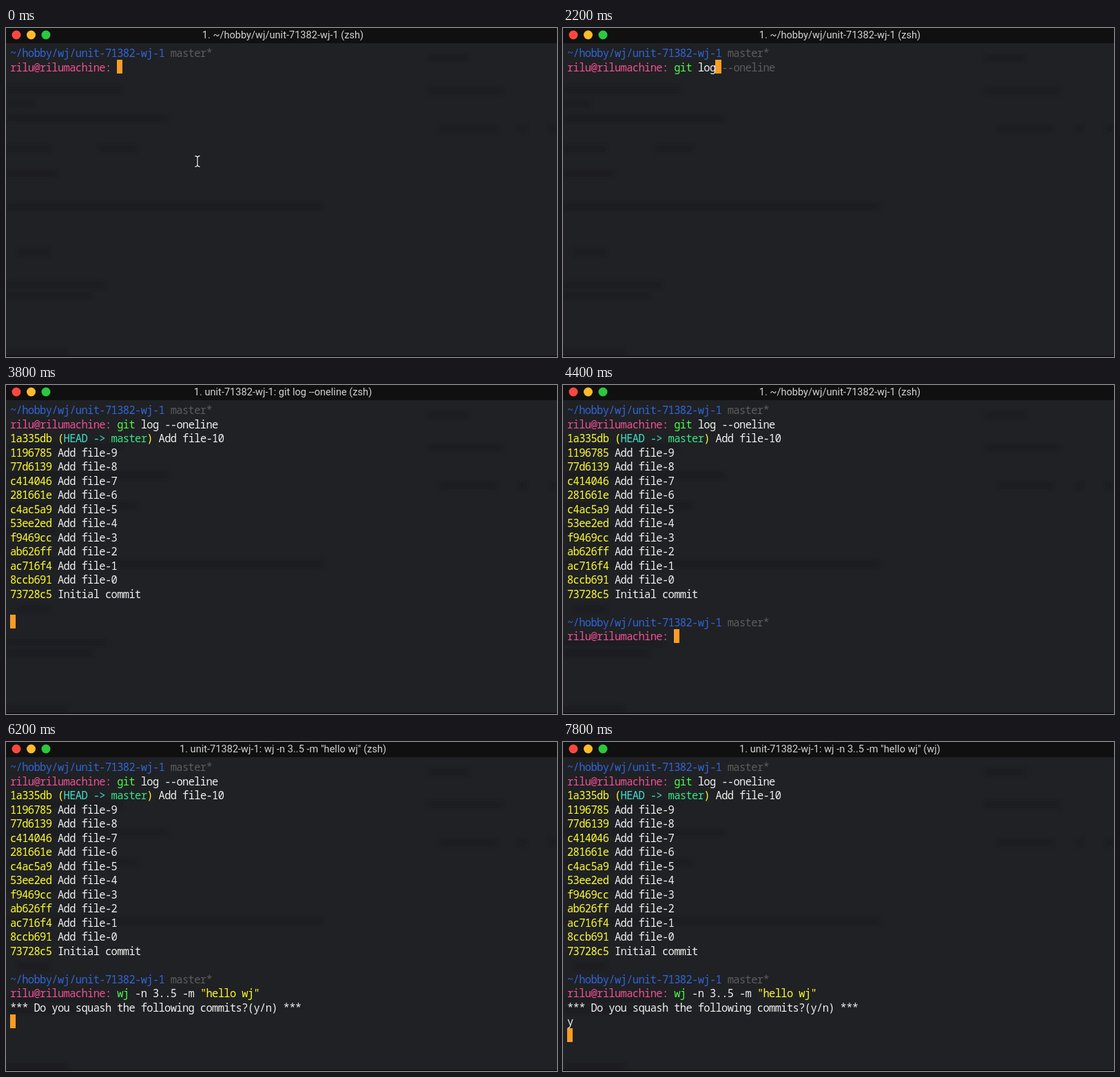
An HTML page that plays this animation: 800x477 px, repeating every 8000 ms.

```html
<!DOCTYPE html>
<html lang="en">
<head>
<meta charset="utf-8">
<title>Terminal</title>
<style>
html, body { margin: 0; width: 100%; height: 100%; overflow: hidden; background: #202124; }
#stage { position: relative; width: 800px; height: 477px; overflow: hidden; background: #202124; }
#stage > * { position: absolute; }
#bar { left: 0; top: 0; width: 800px; height: 22px; background: #101011; }
#title { left: 2px; top: 0; width: 800px; text-align: center; color: #d2d2d2;
  font: 14.6px/21px Roboto, sans-serif; white-space: pre; }
svg { left: 0; top: 0; }
#screen { left: 6px; top: 26.25px; margin: 0; color: #f0f0f0;
  font: 15.5px/20.5px "Noto Sans Mono", monospace; letter-spacing: calc(8.62px - .6em); }
#cursor { width: 8.7px; height: 20px; background: #f99d25; }
.path { color: #2f65d8; } .dim { color: #5c5c5d; } .user { color: #ee5096; }
.ok { color: #4dfa4b; } .bad { color: #f5483f; } .hash { color: #fdfd2c; }
.head { color: #3fe0c8; } .branch { color: #35e887; } .under { color: #4a3a1c; }
</style>
</head>
<body>
<div id="stage">
  <svg width="800" height="477">
    <defs><filter id="soft"><feGaussianBlur stdDeviation="2.5"/></filter></defs>
    <g id="ghosts" fill="#17181a" opacity=".35" filter="url(#soft)"></g>
    <rect y="475.5" width="800" height="1.5" fill="#0c0c0d"/>
  </svg>
  <div id="bar"></div>
  <div id="title"></div>
  <svg width="800" height="22">
    <circle cx="15" cy="10" r="6.5" fill="#fc4741"/>
    <circle cx="36.5" cy="10" r="6.5" fill="#fdbb2c"/>
    <circle cx="58" cy="10" r="6.5" fill="#2bc840"/>
  </svg>
  <div id="cursor"></div>
  <pre id="screen"></pre>
  <svg id="mouse" width="800" height="477" fill="none">
    <path id="beam" d="M274.5 185.5q3.5 0 3.5 3v9.500q0 3-3.500 3M281.500 185.500q-3.500 0-3.500 3M278 198q0 3 3.500 3" stroke="#111" stroke-width="3"/>
    <use href="#beam" style="display:none"/>
    <path d="M274.5 185.5q3.5 0 3.5 3v9.500q0 3-3.500 3M281.500 185.500q-3.500 0-3.500 3M278 198q0 3 3.500 3" stroke="#eee" stroke-width="1.3"/>
  </svg>
</div>
<script>
const $ = id => document.getElementById(id);
const COL = 8.62, ROW = 20.5, LOOP = 8000;
const span = (cls, text) => text && `<span class="${cls}">${text}</span>`;

// Faint window content showing through: x, y, width
$('ghosts').innerHTML = [
  [0, 90, 170], [0, 110, 40], [0, 131, 235], [0, 175, 64], [135, 175, 54], [0, 211, 74],
  [0, 259, 460], [16, 325, 48], [0, 373, 144], [0, 388, 126], [0, 470, 90],
  [612, 44, 60], [612, 91, 110], [630, 146, 82], [744, 146, 12], [788, 146, 12]
].map(([x, y, w]) => `<rect x="${x}" y="${y - 5}" width="${w}" height="10"/>`).join('');

const pathLine = span('path', '~/hobby/wj/unit-71382-wj-1') + span('dim', ' master*');
const prompt = 'rilu@rilumachine: ';
const reset = 'git reset --hard 612bbe6', log = 'git log --oneline', squash = 'wj -n 3..5 -m "hello wj"';

const hashes = '1196785 77d6139 c414046 281661e c4ac5a9 53ee2ed f9469cc ab626ff ac716f4 8ccb691'.split(' ');
const history = [
  span('hash', '1a335db (') + span('head', 'HEAD -&gt; ') + span('branch', 'master') + span('hash', ')') + ' Add file-10',
  ...hashes.map((hash, i) => span('hash', hash) + ' Add file-' + (9 - i)),
  span('hash', '73728c5') + ' Initial commit', ''
];

// Prompt with the typed part highlighted and the rest as a suggestion
function commandLine(command, typed, active) {
  const text = command.slice(0, typed), word = text.split(' ')[0];
  const known = word === 'git' || word === 'wj';
  const args = text.slice(word.length).replace(/".*"/, quoted => span('hash', quoted));
  return span('user', prompt) + span(known ? 'ok' : 'bad', word) + args +
    span(active ? 'under' : 'dim', command[typed] || '') + span('dim', command.slice(typed + 1));
}

// Latest step whose start has passed
const pick = (t, steps) => steps.filter(([start]) => t >= start).pop().slice(1);

function view(t) {
  const lines = [pathLine];
  let title = '~/hobby/wj/unit-71382-wj-1 (zsh)', cursor;
  const type = (command, typed, active) => {
    lines.push(commandLine(command, typed, active));
    cursor = [prompt.length + typed, lines.length - 1];
  };
  const running = (command, name) => title = `unit-71382-wj-1: ${command} (${name})`;

  if (t < 3800) {
    type(...pick(t, [[0, '', 0], [200, reset, 1], [400, reset, 2], [600, reset, 3], [800, reset, 4],
      [2000, log, 5], [2200, log, 7], [3400, log, log.length]]), true);
    return { lines, title, cursor };
  }
  type(log, log.length);
  lines.push(...history);
  if (t < 4000) {
    running(log, 'zsh');
    return { lines, title, cursor: [0, 15] };
  }
  lines.push(pathLine);
  type(...pick(t, [[4000, '', 0], [5000, squash, 1], [5200, squash, 2], [5600, squash, squash.length]]), true);
  if (t >= 6000) {
    running(squash, t < 6400 ? 'zsh' : 'wj');
    cursor = [0, 17];
  }
  if (t >= 6200) {
    lines.push('*** Do you squash the following commits?(y/n) ***');
    cursor = [0, 18];
  }
  if (t >= 7000) {
    lines.push('y');
    cursor = t < 7400 ? [1, 18] : [0, 19];
  }
  return { lines, title, cursor };
}

let shown;
function draw(now) {
  const t = now % LOOP, { lines, title, cursor: [col, row] } = view(t);
  const key = lines.join('\n') + title + col + ',' + row;
  if (key !== shown) {
    shown = key;
    $('screen').innerHTML = lines.join('\n');
    $('title').textContent = '1. ' + title;
    $('cursor').style.left = 5.6 + col * COL + 'px';
    $('cursor').style.top = 25.6 + row * ROW + 'px';
  }
  $('mouse').style.display = t < 200 ? '' : 'none';
  requestAnimationFrame(draw);
}
draw(performance.now());
</script>
</body>
</html>
```
